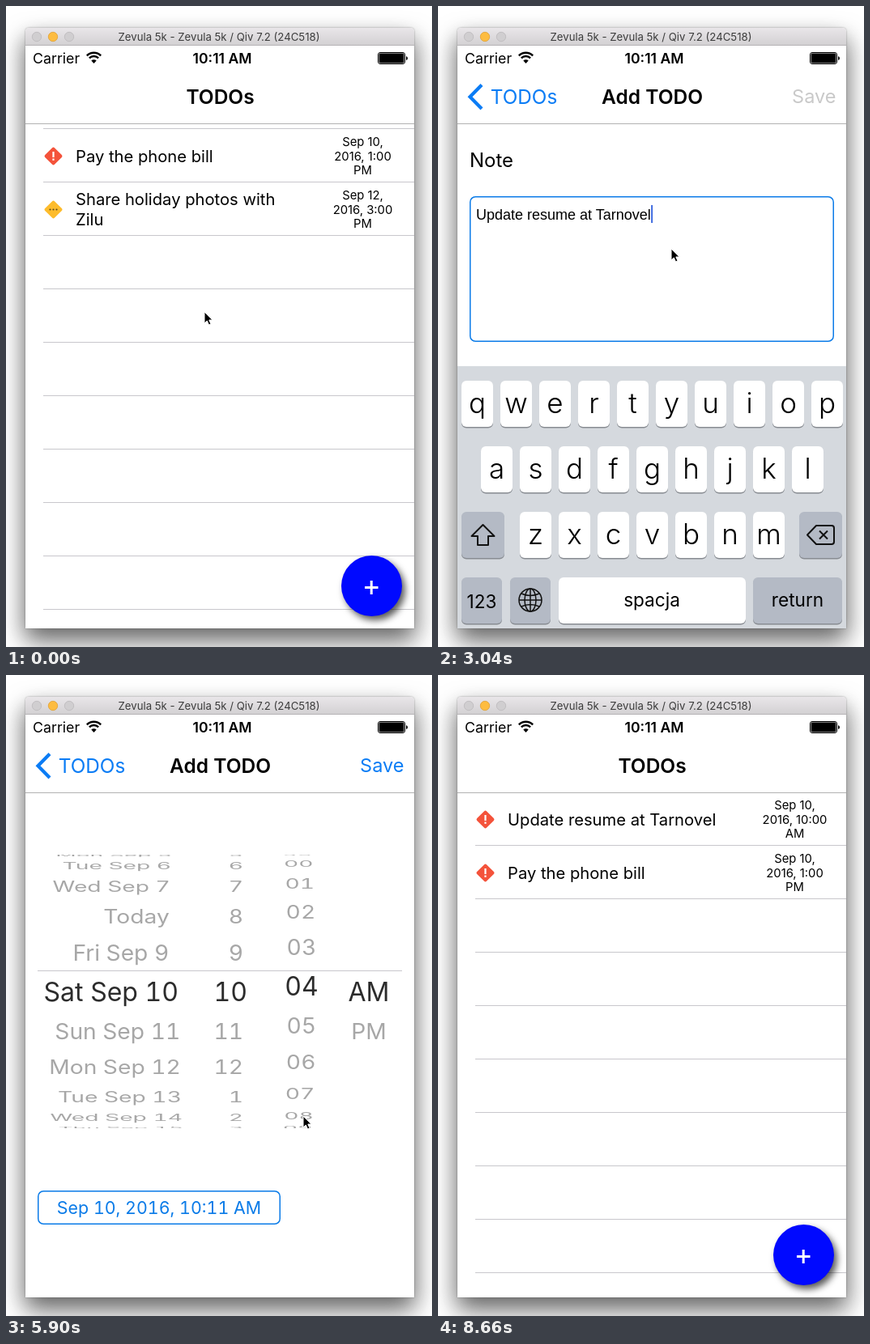
These frames come from a looping animation (526x792 px, 8680 ms). An HTML page:

```html
<!DOCTYPE html>
<html lang="en">
<head>
<meta charset="utf-8">
<title>Todo list demo</title>
<style>
html, body { margin: 0; width: 100%; height: 100%; overflow: hidden; background: #fff; }
svg { display: block; font-family: Inter, Roboto, "Liberation Sans", sans-serif; }
.window { filter: drop-shadow(0 14px 15px rgba(0,0,0,.52)) drop-shadow(0 0 1px rgba(0,0,0,.35)); }
.fab { filter: drop-shadow(4px 5px 4px rgba(0,0,0,.65)); }
.digits { font-variant-numeric: tabular-nums; }
</style>
</head>
<body>
<svg width="526" height="792" viewBox="0 0 526 792">
  <defs>
    <linearGradient id="bar" x2="0" y2="1"><stop stop-color="#e9e6e9"/><stop offset="1" stop-color="#d2d0d2"/></linearGradient>
    <linearGradient id="edge"><stop stop-opacity="0"/><stop offset="1" stop-opacity=".05"/></linearGradient>
    <clipPath id="page"><rect x="24" y="146" width="480" height="623"/></clipPath>
    <clipPath id="nav"><rect x="24" y="49" width="480" height="97"/></clipPath>
    <clipPath id="drum"><rect x="24" y="222" width="480" height="338"/></clipPath>
  </defs>
  <path class="window" d="M24 769V32q0-5 5-5H499q5 0 5 5V769z" fill="#fff"/>
  <path d="M24 49V32q0-5 5-5H499q5 0 5 5V49z" fill="url(#bar)"/>
  <path d="M24 48.5H504" stroke="#b5b3b5"/>
  <g stroke-width=".8">
    <circle cx="38" cy="38" r="5.7" fill="#d0ced0" stroke="#bbb9bb"/>
    <circle cx="58" cy="38" r="5.7" fill="#fdbc40" stroke="#e0a033"/>
    <circle cx="78" cy="38" r="5.7" fill="#d0ced0" stroke="#bbb9bb"/>
  </g>
  <text x="263" y="43" font-size="13.2" text-anchor="middle" fill="#3c3c3c">Zevula 5k - Zevula 5k / Qiv 7.2 (24C518)</text>
  <g id="screen"></g>
</svg>
<script>
const LOOP = 8680, STEP = 20;
const RED = '#ec2d17', BLUE = '#0a7be8', TINT = '#0a7cf5', ROW = 66;
const NOTE = 'Update resume at Tarnovel';
const screen = document.getElementById('screen');
const ruler = document.createElement('canvas').getContext('2d');
ruler.font = '18px "Liberation Sans", Arial, sans-serif';

const clamp = v => Math.max(0, Math.min(1, v));
const smooth = u => u * u * (3 - 2 * u);
const out = u => 1 - (1 - u) ** 4;
const ramp = (t, start, length, ease = smooth) => ease(clamp((t - start) / length));

// Critically damped spring, used for page transitions.
function spring(t, start) {
  const k = .0548 * Math.max(0, t - start);
  return k > 11 ? 1 : 1 - (1 + k) * Math.exp(-k);
}

// Interpolates [time, value...] keys.
function track(keys, t, ease = smooth) {
  const next = keys.findIndex(k => k[0] > t);
  if (next < 0) return keys[keys.length - 1].slice(1);
  if (next === 0) return keys[0].slice(1);
  const a = keys[next - 1], b = keys[next];
  const u = ease((t - a[0]) / (b[0] - a[0]));
  return a.slice(1).map((v, i) => v + (b[i + 1] - v) * u);
}

// Text is placed by the middle of its capitals.
const text = (s, x, y, size, fill = '#000', anchor = 'start', extra = '') =>
  `<text x="${x}" y="${y + size * .36}" font-size="${size}" fill="${fill}" text-anchor="${anchor}" ${extra}>${s}</text>`;
const mid = (s, x, y, size, fill, extra) => text(s, x, y, size, fill, 'middle', extra);
const rect = (x, y, w, h, fill, extra = '') =>
  `<rect x="${x}" y="${y}" width="${w}" height="${h}" fill="${fill}" ${extra}/>`;
const box = (x, y, w, h, stroke, fill = 'none') =>
  rect(x + .75, y + .75, w - 1.5, h - 1.5, fill, `rx="6.5" stroke="${stroke}" stroke-width="1.5"`);
const line = (x1, x2, y, color = '#c8c7cc') =>
  `<path d="M${x1} ${y}H${x2}" stroke="${color}"/>`;
const group = (content, x = 0, opacity = 1) =>
  `<g transform="translate(${x} 0)" opacity="${opacity}">${content}</g>`;

function statusBar() {
  const arc = r => `<path d="M${108.5 - r * .72} ${70 - r * .72}A${r} ${r} 0 0 1 ${108.5 + r * .72} ${70 - r * .72}" fill="none" stroke="#000" stroke-width="2.4"/>`;
  return text('Carrier', 33, 64.5, 17.8) + arc(12) + arc(7.8) +
    '<path d="M108.5 71l-3.2-3.4a4.5 4.5 0 0 1 6.4 0z"/>' +
    mid('10:11 AM', 267, 64.5, 17.6, '#000', 'font-weight="600"') +
    rect(459.5, 57.5, 33, 14, '#fff', 'rx="2.5" stroke="#000"') +
    rect(460.6, 58.6, 30.8, 11.8, '#000', 'rx="1.4"') +
    '<path d="M494 62q2 .5 2 2.5t-2 2.5z"/>';
}

function navBar(t, p) {
  const q = 1 - (1 - p) ** 1.15;
  const x = 264.5 - 158.5 * q;
  const backOpacity = .45 * p + .55 * p ** 60;
  const titleOpacity = clamp((p - .17) / .79);
  const back = `<path d="M54 97.5L39.5 112.2L54 127" fill="none" stroke="${TINT}" stroke-width="4.2"/>` +
    mid('TODOs', x, 112, 24.3, TINT);
  const heading = s => mid(s, 0, 112, 24.5, '#000', 'font-weight="600"');
  return statusBar() + '<g clip-path="url(#nav)">' +
    group(heading('TODOs'), x, clamp(1 - 3.2 * p)) + group(back, 0, backOpacity) +
    group(heading('Add TODO'), 264.5 + 300 * (1 - q), titleOpacity) +
    group(text('Save', 491.5, 112, 23.5, t > 5120 ? TINT : '#c9c9c9', 'end'), 0, titleOpacity) +
    '</g>' + line(24, 504, 145.5, '#b2b2b2');
}

function icon(y, urgent) {
  const mark = urgent
    ? rect(57.4, y - 5.5, 2.2, 7, '#fff') + rect(57.4, y + 3, 2.2, 2.3, '#fff')
    : [-4, 0, 4].map(d => `<circle cx="${58.5 + d}" cy="${y}" r="1.1" fill="#5c4a1c"/>`).join('');
  return rect(50.2, y - 8.3, 16.6, 16.6, urgent ? '#f4533b' : '#fdbc2c', `rx="2" transform="rotate(45 58.5 ${y})"`) + mark;
}

function listRows(t) {
  const swipe = (start, tapped) => t < tapped ? ramp(t, start, 150) : 1;
  const rows = [
    { title: ['Pick up kids from school'], date: ['Today, 5:00', 'PM'], urgent: 1, swipe: swipe(7200, 7590), size: 1 - ramp(t, 7590, 120) },
    { title: [NOTE], date: ['Sep 10,', '2016, 10:00', 'AM'], urgent: 1, swipe: 0, size: ramp(t, 6842, 100) },
    { title: ['Pay the phone bill'], date: ['Sep 10,', '2016, 1:00', 'PM'], urgent: 1, swipe: 0, size: 1 },
    { title: ['Share holiday photos with', 'Zilu'], date: ['Sep 12,', '2016, 3:00', 'PM'], urgent: 0, swipe: swipe(7960, 8350), size: 1 - ramp(t, 8350, 120) }
  ];
  return rows.filter(r => r.size > 0);
}

function listPage(t, p) {
  const scroll = 59 * (1 - ramp(t, 10, 320));
  const rows = listRows(t);
  let y = 145 - scroll, s = '';
  for (const r of rows) {
    const c = y + ROW * r.size - 33 + .5;
    const lines = (items, x, size, gap, anchor) => items.map((v, i) =>
      text(v, x, c + (i - (items.length - 1) / 2) * gap, size, '#000', anchor)).join('');
    const content = icon(c, r.urgent) + lines(r.title, 86, 20.2, 24.7) + lines(r.date, 440.5, 14.8, 17.6, 'middle');
    const shift = 111 * r.swipe;
    const opacity = clamp(2 * r.size - 1);
    if (shift) s += rect(504 - shift, y, shift, ROW * r.size, '#ff3b30') +
      group(mid('Delete', 560, c, 20, '#fff'), -shift, opacity);
    s += group(content, -shift, opacity);
    y += ROW * r.size;
    s += line(46, 504, y - .5);
  }
  for (let k = rows.length; k < 11; k++) s += line(46, 504, 210.5 + ROW * k - scroll);
  const fab = '<circle class="fab" cx="451.5" cy="716.5" r="37.5" fill="#0009ff"/>' +
    '<path d="M443 718.5H459.5M451.2 710V727" stroke="#fff" stroke-width="3"/>';
  return rect(24, 146, 480, 623, '#fff') + group(s + fab, -144 * p) +
    rect(24, 146, 480, 623, '#000', `opacity="${.1 * p}"`);
}

function wheel(pos, first, last, label, place) {
  let s = '';
  for (let i = Math.max(first, Math.round(pos) - 5); i <= Math.min(last, Math.round(pos) + 5); i++) {
    const angle = (i - pos) * .2897;
    if (Math.abs(angle) > 1.53) continue;
    const near = Math.abs(i - pos) < .5;
    const [x, anchor] = place(i, near, 1 - Math.cos(angle));
    s += `<g transform="translate(${x} ${391.5 + 170 * Math.sin(angle)}) scale(1 ${Math.cos(angle)})">` +
      text(label(i), 0, 0, near ? 32 : 28.2, near ? '#2c2c2c' : '#a7a7a7', anchor) + '</g>';
  }
  return s;
}

function picker(t) {
  const day = 8 + 2 * ramp(t, 4780, 280);
  const [minute] = track([[5380, 11], [5620, 8], [5690, 8], [5900, 4.14], [6080, 1], [6250, 0]], t, u => u);
  const names = ['Thu', 'Fri', 'Sat', 'Sun', 'Mon', 'Tue', 'Wed'];
  const dayName = i => i === 8 ? 'Today' : `${names[(i + 6) % 7]} Sep ${i}`;
  const dayPlace = (i, near, bend) => [(i > 9 ? 215 : 201) - (near ? 2 : 0) + 5 * bend, 'end'];
  return rect(39, 160, 450, 462, '#fff') + line(39, 489, 365.5) + '<g class="digits" clip-path="url(#drum)">' +
    wheel(day, 1, 30, dayName, dayPlace) +
    wheel(10, 1, 20, i => (i + 11) % 12 + 1, (i, near) => [near ? 298 : 293, 'end']) +
    wheel(minute, -9, 40, i => String((i + 60) % 60).padStart(2, '0'), (i, near, bend) => [365 - 6 * bend, 'middle']) +
    wheel(0, 0, 1, i => 'AP'[i] + 'M', () => [448, 'middle']) + '</g>';
}

function formPage(t, p) {
  const typed = NOTE.slice(0, clamp((t - 1620) / 1300) * NOTE.length);
  const chosen = t > 3900, dated = t > 5120;
  const segColor = chosen ? BLUE : RED, dateColor = dated ? BLUE : RED;
  let s = p < 1 ? rect(18, 146, 6, 623, 'url(#edge)') : rect(24, 146, 480, 623, '#fff');
  s += text('Note', 39, 190, 24) + text('Priority', 39, 460, 24) + text('Date', 39, 592, 24);
  s += box(39, 235, 450, 180, typed ? BLUE : RED, '#fff');
  s += text(typed, 47, 257.5, 18, '#000', 'start', 'font-family="Liberation Sans, Arial, sans-serif"');
  if (t > 1250 && t < 3420) s += rect(47 + ruler.measureText(typed).width, 246, 2, 22, '#3f6be0');
  if (chosen) s += `<path d="M151 505H46q-7 0-7 7V542q0 7 7 7H151z" fill="${BLUE}"/>`;
  s += box(39, 505, 450, 44, segColor);
  ['Urgent', 'High', 'Medium', 'Low'].forEach((name, i) => {
    if (i) s += `<path d="M${38.5 + 112.3 * i} 505V549" stroke="${segColor}" stroke-width="1.5"/>`;
    s += mid(name, 94.5 + 112.6 * i, 527, 19.2, chosen && !i ? '#fff' : segColor);
  });
  s += box(39, 637, 300, 42, dateColor);
  const label = dated ? `Sep 10, 2016, 10:${t > 6250 ? '00' : '11'} AM` : 'Select future date';
  s += mid(label, 189, 658.5, 21.4, dateColor, 'class="digits"');
  if (t > 4400) s += group(picker(t), 0, ramp(t, 4400, 100));
  return group(s, 480 * (1 - p));
}

function keyboard(t) {
  const up = ramp(t, 1230, 150, out) - ramp(t, 3420, 140);
  if (up <= 0) return '';
  const caps = t < 1620 + 1300 / NOTE.length;
  const key = (x, y, w, fill, content) =>
    rect(x, y + 1.5, w, 57, '#888c92', 'rx="6"') + rect(x, y, w, 57, fill, 'rx="6"') + content;
  const GREY = '#b4bac5';
  let s = rect(24, 445, 480, 324, '#d5d9de');
  ['qwertyuiop', 'asdfghjkl', 'zxcvbnm'].forEach((letters, r) => [...letters].forEach((c, i) => {
    const x = [29, 53, 101][r] + 48 * i, y = 463 + 81 * r;
    s += key(x, y, 39, '#fff', mid(caps ? c.toUpperCase() : c, x + 19.5, y + 27, caps ? 32 : 35, '#000', 'font-weight="300"'));
  }));
  const pen = d => `<path d="${d}" fill="none" stroke="#111" stroke-width="2" stroke-linejoin="round"/>`;
  s += key(29, 625, 53, caps ? '#fff' : GREY, pen('M55.5 641l14 14h-7.5v11h-13v-11h-7.5z'));
  s += key(446, 625, 53, GREY, pen('M456 653.5l11-11.5h19q3 0 3 3v17q0 3-3 3h-19zM471 648.5l10 10m0-10l-10 10'));
  s += key(29, 706, 50, GREY, mid('123', 54, 735.5, 22.5));
  s += key(89, 706, 50, GREY, '<g fill="none" stroke="#111" stroke-width="1.5"><circle cx="114" cy="734" r="14"/><ellipse cx="114" cy="734" rx="7" ry="14"/><path d="M100 734h28M114 720v28M103 726q11 5 22 0M103 742q11-5 22 0"/></g>');
  s += key(149, 706, 231, '#fff', mid('spacja', 264, 734, 22.6));
  s += key(389, 706, 110, GREY, mid('return', 444, 734, 22.6));
  return `<g transform="translate(0 ${324 * (1 - up)})">${s}</g>`;
}

const cursorPath = [
  [0, 245, 378], [260, 245, 425], [560, 442, 704], [900, 442, 704], [1180, 288, 300],
  [3250, 288, 300], [3400, 250, 190], [3500, 250, 190], [3840, 94, 524], [3960, 94, 524],
  [4300, 203, 660], [4560, 203, 660], [4770, 140, 440], [5000, 140, 345], [5360, 367, 400],
  [5620, 367, 540], [5690, 367, 440], [5880, 367, 545], [6300, 367, 552], [6740, 464, 117],
  [6960, 464, 117], [7180, 430, 178], [7350, 310, 178], [7540, 450, 180], [7650, 450, 180],
  [7930, 430, 310], [8110, 310, 310], [8300, 450, 310], [8560, 450, 310]
];

function cursor(t) {
  if (t > 8560) return '';
  const [x, y] = track(cursorPath, t);
  return `<path transform="translate(${x} ${y})" d="M0 0V14L3.3 11L5.5 16L8 15L5.8 10H10z" fill="#000" stroke="#fff" stroke-width="1"/>`;
}

function render(t) {
  const p = spring(t, 665) - spring(t, 6838);
  screen.innerHTML = '<g clip-path="url(#page)">' +
    (p < 1 ? listPage(t, p) : '') + (p > 0 ? formPage(t, p) : '') + keyboard(t) + '</g>' +
    navBar(t, p) + cursor(t);
}

const start = performance.now();
function tick() {
  const step = Math.floor((performance.now() - start + 2) / STEP);
  render(step * STEP % LOOP);
  requestAnimationFrame(tick);
}
tick();
</script>
</body>
</html>
```
